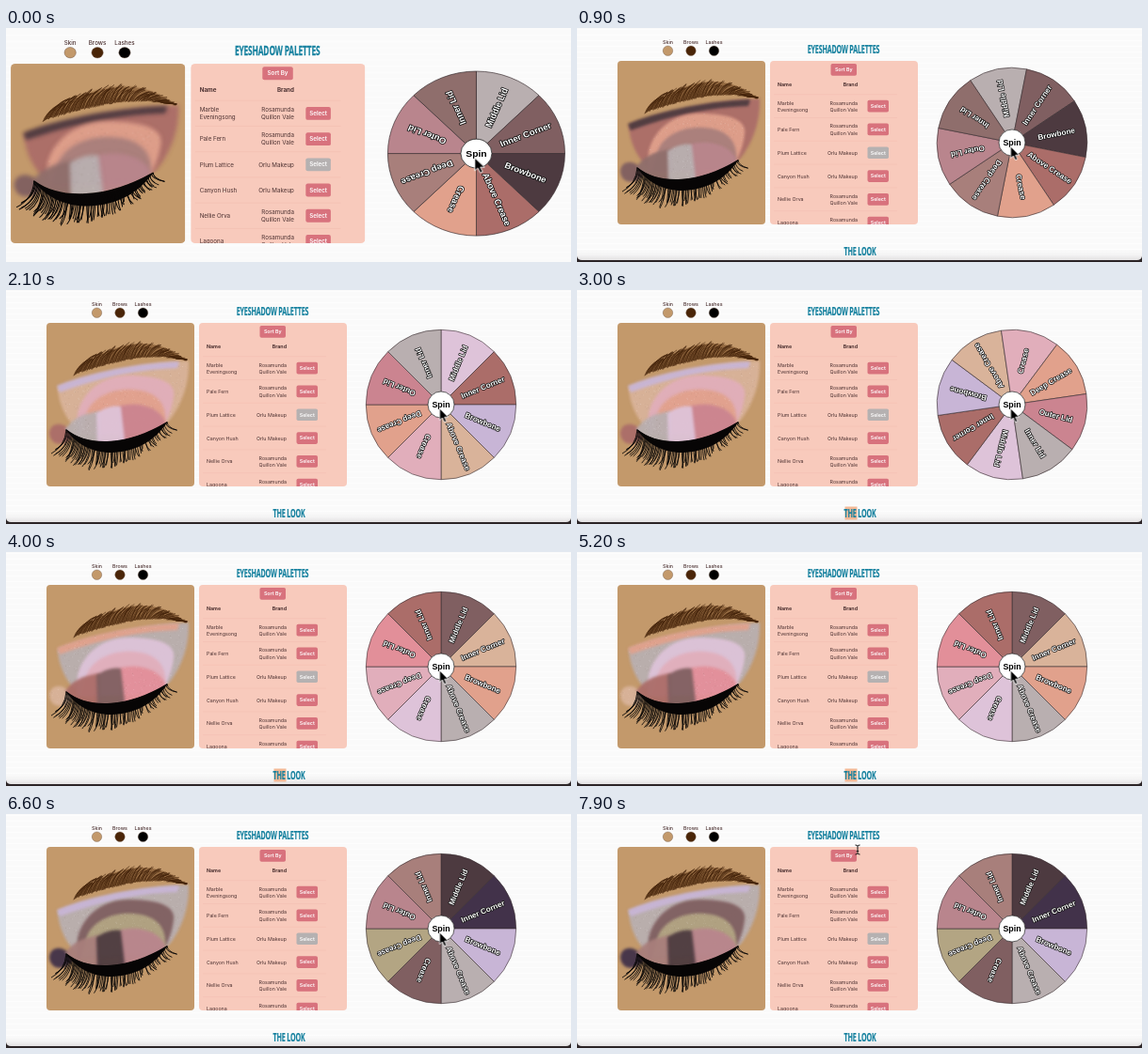
An HTML page that plays this animation: 600 px wide and 249 px high, repeating every 8000 ms.

```html
<!DOCTYPE html>
<html lang="en">
<head>
<meta charset="utf-8">
<title>Eyeshadow wheel</title>
<style>
  @property --turn { syntax: "<angle>"; inherits: false; initial-value: 0deg; }
  html, body { margin: 0; width: 100%; height: 100%; overflow: hidden; background: #fafafa; }
  svg { display: block; width: 600px; height: 249px; }
  text { font-family: Inter, "Liberation Sans", sans-serif; font-size: 5.3px; fill: #4b3030; }
  .title { font: 700 12.5px "Open Sans", "Noto Sans", sans-serif; fill: #16819f; stroke: #16819f; stroke-width: .25px; text-anchor: middle; letter-spacing: -.3px; }
  .bold { font-weight: 700; }
  .mid { text-anchor: middle; font-weight: 500; }
  .end { text-anchor: end; }
  .button { font-weight: 600; fill: #fff; text-anchor: middle; }
  .slice { stroke: #3b3033; stroke-width: .6; }
  .label { font: 700 8.2px "Liberation Sans", Arial, sans-serif; fill: #fff; stroke: #111; stroke-width: 1.4px; stroke-linejoin: round; paint-order: stroke; text-anchor: middle; }
  .spin { font: 700 8.8px "Liberation Sans", Arial, sans-serif; fill: #000; text-anchor: middle; }
  #wheel { transform: rotate(var(--turn)); }
</style>
</head>
<body>
<svg viewBox="0 0 600 249">
  <defs>
    <pattern id="boards" width="600" height="6" patternUnits="userSpaceOnUse">
      <path fill="#fafafa" d="M0 0H600V6H0Z"/>
      <path fill="#fdfdfd" d="M0 1H600V2.2H0Z"/>
    </pattern>
    <pattern id="glitter" width="40" height="40" patternUnits="userSpaceOnUse"></pattern>
    <linearGradient id="shade" x2="0" y2="1">
      <stop stop-color="#f4f4f4" stop-opacity="0"/>
      <stop offset="1" stop-color="#dcdadb"/>
    </linearGradient>
    <filter id="soft" x="-30%" y="-30%" width="160%" height="160%"><feGaussianBlur stdDeviation="1.8"/></filter>
    <clipPath id="card"><rect x="43" y="35" width="157" height="174" rx="4"/></clipPath>
    <clipPath id="panel"><rect x="205" y="35" width="157" height="174" rx="4"/></clipPath>
    <clipPath id="upper"><path d="M43 35H200V130L171 141C130 166 88 168 64 149L43 140Z"/></clipPath>
  </defs>
  <g id="scene">
    <rect x="-10" width="640" height="260" fill="url(#boards)"/>
    <g id="swatches"></g>
    <text class="title" transform="translate(283 27) scale(.57 1)">EYESHADOW PALETTES</text>
    <g clip-path="url(#card)">
      <rect x="43" y="35" width="157" height="174" fill="#c3996b"/>
      <g id="corner"></g>
      <g id="lid" clip-path="url(#upper)"></g>
      <g id="brow" fill="none" stroke="#45240c" stroke-linecap="round"></g>
      <g id="lashes" fill="none" stroke="#080606" stroke-linecap="round"></g>
    </g>
    <g id="table" clip-path="url(#panel)">
      <rect x="205" y="35" width="157" height="174" fill="#f8cabc"/>
    </g>
    <g transform="translate(462 122)">
      <g id="wheel"></g>
      <circle r="14" fill="#fff" stroke="#222" stroke-width=".7"/>
      <text class="spin" y="3">Spin</text>
    </g>
    <rect y="236" width="600" height="11" fill="url(#shade)" opacity=".8"/>
    <rect id="mark" x="284.5" y="230.5" width="13" height="14" fill="#f2b997"/>
    <text class="title" transform="translate(300.5 241.5) scale(.57 1)">THE LOOK</text>
    <path fill="#2b2426" d="M0 243Q1 247 5 247H595Q599 247 600 243V249H0Z"/>
    <g id="pointer">
      <path id="arrow" d="M0 0V12.6L2.9 10 5 14.6 7.2 13.6 5.2 9.2H9Z" fill="#000" stroke="#fff" stroke-width=".8"/>
      <path id="beam" d="M-2.5 -5Q0 -5 0 -3.5Q0 -5 2.5 -5M0 -3.5V3.5M-2.5 5Q0 5 0 3.5Q0 5 2.5 5M-1.2 1.5H1.2" fill="none" stroke="#111"/>
    </g>
  </g>
</svg>
<script>
const LOOP = 8000;
const SPIN = 1000;
const STARTS = [268, 2719, 5364];
const CHANGES = [0, ...STARTS.map(s => s + SPIN)];

const $ = id => document.getElementById(id);

function add(parent, tag, attrs, text) {
  const el = document.createElementNS("http://www.w3.org/2000/svg", tag);
  for (const key in attrs) el.setAttribute(key, attrs[key]);
  if (text) el.textContent = text;
  parent.append(el);
  return el;
}

// Steps are [time, value, easing]; without an easing the value holds.
function track(el, prop, steps) {
  const last = steps[steps.length - 1];
  const frames = [...steps, [LOOP, last[1]]].map(([time, value, easing = "step-end"]) =>
    ({ offset: time / LOOP, [prop]: value, easing }));
  el.animate(frames, { duration: LOOP, iterations: Infinity });
}

function seeded(seed) {
  return () => (seed = (seed * 16807) % 2147483647) / 2147483647;
}
const random = seeded(71);
const jitter = size => (random() - .5) * size;

function bezier(points, u) {
  const v = 1 - u;
  const weights = [v * v * v, 3 * v * v * u, 3 * v * u * u, u * u * u];
  return [0, 1].map(axis => weights.reduce((sum, w, i) => sum + w * points[i][axis], 0));
}

// Shades, in the order of the wheel labels
const silver = "#b9afb0", mauve = "#805f61", plum = "#4d3a40", brick = "#ab6d69",
  peach = "#e1a18c", taupe = "#a87f7b", rose = "#b9858d", cocoa = "#8f6e6c",
  lilac = "#dec3d9", lavender = "#c8b5d6", sand = "#d9b39a", pink = "#e1aebb",
  berry = "#cb8490", coral = "#e28f99", violet = "#42324a", olive = "#b3a583";
const LABELS = ["Middle Lid", "Inner Corner", "Browbone", "Above Crease",
  "Crease", "Deep Crease", "Outer Lid", "Inner Lid"];
const LOOKS = [
  [silver, mauve, plum, brick, peach, taupe, rose, cocoa],
  [lilac, brick, lavender, sand, pink, peach, berry, silver],
  [mauve, sand, peach, silver, lilac, pink, coral, brick],
  [plum, violet, lavender, silver, mauve, olive, rose, taupe]
];
const SHIMMER = [silver, sand, peach, olive, coral];

const shadeSteps = i => LOOKS.map((look, n) => [CHANGES[n], look[i]]);

function drawWheel() {
  const R = 79.7, h = R * Math.SQRT1_2;
  LABELS.forEach((_, i) => {
    const slice = add($("wheel"), "path", {
      class: "slice", d: `M0 0V${-R}A${R} ${R} 0 0 1 ${h} ${-h}Z`, transform: `rotate(${i * 45})`
    });
    track(slice, "fill", shadeSteps(i));
  });
  LABELS.forEach((label, i) => add($("wheel"), "text", {
    class: "label", x: 48, y: 2.8, transform: `rotate(${i * 45 - 67.5})`
  }, label));
  const turns = STARTS.flatMap(s => [[s, "0deg", "ease"], [s + SPIN, "360deg"]]);
  track($("wheel"), "--turn", [[0, "0deg"], ...turns]);
}

function drawShadow() {
  for (let i = 0; i < 130; i++) {
    add($("glitter"), "circle", {
      cx: random() * 40, cy: random() * 40, r: .25 + random() * .3,
      fill: i % 3 ? "#fff" : "#765", opacity: .5
    });
  }
  const areas = [
    ["Inner Corner", "M46 153C46 142 58 139 67 148L72 155C62 167 48 167 46 153Z"],
    ["Above Crease", "M55 103C90 90 140 78 194 75C195 100 186 126 168 145L80 152C63 140 55 118 55 103Z"],
    ["Browbone", "M54 102C80 91 130 78 184 76L182 83C130 85 90 97 57 109Z"],
    ["Crease", "M76 132C82 106 105 91 130 91C157 91 181 96 178 113C176 131 168 143 165 150L75 153Z"],
    ["Deep Crease", "M86 130C93 113 115 104 136 106C160 108 174 121 168 150L80 153Z"],
    ["Outer Lid", "M120 124C140 118 163 125 169 140C168 155 150 168 122 168Z"],
    ["Inner Lid", "M62 150C68 138 82 131 100 129V168H70Z"],
    ["Middle Lid", "M96 131C105 125 115 122 122 124L127 168H97Z"]
  ];
  for (const [name, d] of areas) {
    const i = LABELS.indexOf(name);
    const group = $(name === "Inner Corner" ? "corner" : "lid");
    const area = add(group, "path", { d, filter: "url(#soft)", opacity: .95 });
    track(area, "fill", shadeSteps(i));
    const sparkle = add(group, "path", { d, fill: "url(#glitter)" });
    track(sparkle, "opacity", LOOKS.map((look, n) => [CHANGES[n], SHIMMER.includes(look[i]) ? .45 : 0]));
  }
}

function drawBrow() {
  const low = [[72, 90], [112, 76], [155, 64], [192, 75]];
  const high = [[76, 80], [106, 62], [148, 38], [192, 74]];
  add($("brow"), "path", {
    d: "M73 89C112 76 155 64 192 75C148 40 106 64 78 82Z", fill: "#5b3210", stroke: "none", opacity: .45
  });
  for (let i = 0; i < 140; i++) {
    const u = i / 140;
    const [x, y] = bezier(low, u);
    const [tx, ty] = bezier(high, Math.min(1, u + .09 + random() * .08));
    const k = .65 + random() * .4;
    const ex = x + (tx - x) * k, ey = y + (ty - y) * k;
    add($("brow"), "path", {
      d: `M${x} ${y + jitter(2)}Q${x + (ex - x) * .3} ${y + (ey - y) * .75} ${ex} ${ey}`,
      "stroke-width": .65
    });
  }
}

function drawLashes() {
  const rim = [[64, 149], [88, 168], [130, 166], [171, 141]];
  add($("lashes"), "path", { d: "M64 149C88 168 130 166 171 141", "stroke-width": 1.5 });
  add($("lashes"), "path", {
    d: "M64 149C88 168 130 166 171 141C155 164 135 172 112 173C90 173 74 163 64 149Z", fill: "#080606", stroke: "none"
  });
  for (let i = 0; i < 85; i++) {
    const u = i / 84;
    const [x, y] = bezier(rim, u);
    const drop = (8 + 17 * (1 - u) + 12 * Math.sin(Math.PI * u)) * (.75 + random() * .3);
    const lean = -13 + 22 * u + jitter(8);
    add($("lashes"), "path", {
      d: `M${x} ${y}Q${x + lean * .1} ${y + drop * .7} ${x + lean} ${y + drop}`,
      "stroke-width": .85
    });
  }
}

function drawTable() {
  const table = $("table");
  const button = (x, y, w, label, fill) => {
    add(table, "rect", { x, y, width: w, height: 12.7, rx: 1.8, fill });
    add(table, "text", { class: "button", x: x + w / 2, y: y + 8.2 }, label);
  };
  const lines = (text, x, y, cls = "") => {
    const parts = text.split("|");
    parts.forEach((part, i) => add(table, "text", {
      class: cls, x, y: y + 2 + (i - (parts.length - 1) / 2) * 7.3
    }, part));
  };
  button(269.5, 38, 27.5, "Sort By", "#d8727d");
  lines("Name", 213, 60, "bold");
  lines("Brand", 298, 60, "bold end");
  const maker = "Rosamunda|Quillon Vale", other = "Orlu Makeup";
  const rows = [
    ["Marble|Eveningsong", maker], ["Pale Fern", maker], ["Plum Lattice", other],
    ["Canyon Hush", other], ["Nellie Orva", maker], ["Lagoona", maker]
  ];
  rows.forEach(([name, brand], i) => {
    const y = 83.2 + i * 24.8;
    add(table, "path", { d: `M209 ${y - 12.5}H340`, stroke: "#efb9ac", "stroke-width": .4 });
    lines(name, 213, y);
    lines(brand, 298, y, "end");
    button(308.5, y - 6.4, 22.5, "Select", i === 2 ? "#b5b1b1" : "#d8727d");
  });
}

function drawSwatches() {
  [["Skin", "#c3996b"], ["Brows", "#4a2508"], ["Lashes", "#000"]].forEach(([name, fill], i) => {
    const cx = 96.5 + i * 24.5;
    add($("swatches"), "text", { class: "mid", x: cx, y: 17 }, name);
    add($("swatches"), "circle", { cx, cy: 24.2, r: 5.2, fill, stroke: "#6b5140", "stroke-width": .4 });
  });
}

drawSwatches();
drawShadow();
drawBrow();
drawLashes();
drawTable();
drawWheel();

track($("scene"), "transform", [[0, "matrix(1.18, 0, 0, 1.098, -45.7, -.4)"], [100, "matrix(1, 0, 0, 1, 0, 0)"]]);
track($("mark"), "opacity", [[0, 0], [STARTS[1], 1], [STARTS[2], 0]]);
track($("pointer"), "transform", [
  [0, "translate(460.5px, 126px)"],
  [7300, "translate(460.5px, 126px)", "ease-in-out"],
  [7800, "translate(298px, 38px)"]
]);
track($("arrow"), "opacity", [[0, 1], [7700, 0]]);
track($("beam"), "opacity", [[0, 0], [7700, 1]]);
</script>
</body>
</html>
```
